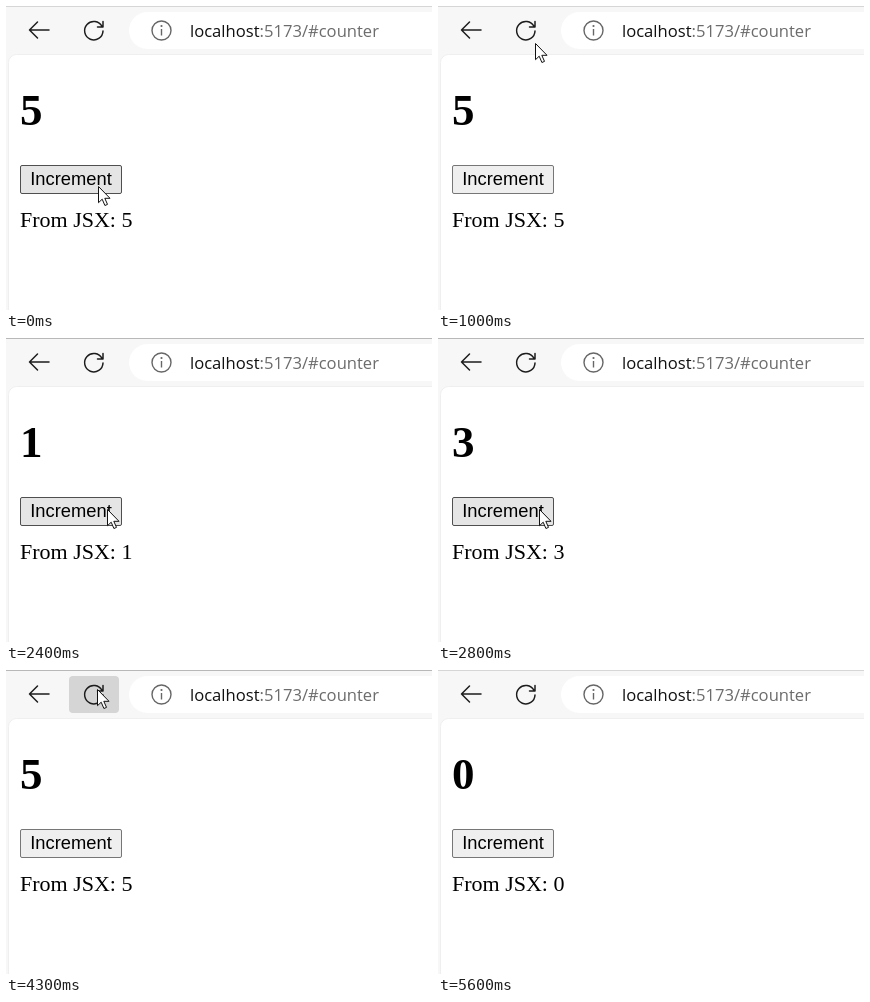
An HTML page that plays this animation: 426 px wide and 304 px high, repeating every 5700 ms.

```html
<!DOCTYPE html>
<html lang="en">
<head>
<meta charset="utf-8">
<title>Counter demo</title>
<style>
  html, body { margin: 0; width: 100%; height: 100%; overflow: hidden; background: #fff; }
  svg { display: block; width: 426px; height: 304px; }
  text { white-space: pre; }
  .url { font: 16.6px "Open Sans", "Noto Sans", sans-serif; }
  .serif { font-family: "Liberation Serif", serif; }
  .icon { fill: none; stroke: #1c1c1c; stroke-width: 1.5; stroke-linecap: round; stroke-linejoin: round; }
</style>
</head>
<body>
<svg viewBox="0 0 426 304">
  <rect width="426" height="304" fill="#f7f7f7"/>
  <rect id="edge" width="426" height="1"/>
  <rect x="2.5" y="48.5" width="440" height="270" rx="8" fill="#fff" stroke="#efefef"/>
  <rect x="123" y="6" width="330" height="37" rx="18.5" fill="#fff"/>
  <rect id="reload" x="63" y="6" width="50" height="37" rx="4"/>

  <g class="icon">
    <path d="M43 24H23.5M31.5 16L23.5 24L31.5 32"/>
    <path d="M97 25A9.2 9.2 0 1 1 96 20.5M97 15.5V21H91.5"/>
  </g>
  <g fill="none" stroke="#666" stroke-width="1.4">
    <circle cx="155.5" cy="24.5" r="9.5"/>
    <path d="M155.5 23V29.5"/>
  </g>
  <circle cx="155.5" cy="20" r="1.1" fill="#666"/>
  <text class="url" x="184" y="31" fill="#6c6c6c"><tspan fill="#111">localhost</tspan>:5173/#counter</text>

  <text id="heading" class="serif" x="14" y="118.5" font-size="45" font-weight="700"></text>
  <rect id="button" x="14.5" y="159.5" width="101" height="28" rx="1.5"/>
  <text x="65" y="179" text-anchor="middle" font-family="Liberation Sans, sans-serif" font-size="18.33">Increment</text>
  <text id="label" class="serif" x="14" y="221" font-size="22"></text>

  <path id="cursor" d="M0 0V16.2L3.7 12.7L6.4 19L9 17.9L6.3 11.8H11.5Z"
    fill="#fff" stroke="#111" stroke-linejoin="round"/>
</svg>
<script>
  const LOOP = 5700, STEP = 100;
  const FIRST_RELOAD = 1300, FIRST_CLICK = 2200, CLICK_GAP = 250, SECOND_RELOAD = 4500;
  const FOCUS = 1100, BLUR = 5600;

  const onButton = { x: 101, y: 171 }, onReload = { x: 91, y: 19 };

  // The pointer eases from one stop to the next.
  const stops = [
    { t: 0, x: 92, y: 180 },
    { t: 700, x: 92, y: 180 },
    { t: 1000, x: 97, y: 37 },
    { t: 1100, ...onReload },
    { t: 1400, ...onReload },
    { t: 1800, x: 105, y: 154 },
    { t: 2000, ...onButton },
    { t: 3400, ...onButton },
    { t: 3500, x: 107, y: 107 },
    { t: 4000, ...onReload },
    { t: 4500, ...onReload },
    { t: 4900, x: 164, y: -30 }
  ];

  const el = id => document.getElementById(id);
  const clamp = (v, lo, hi) => Math.min(hi, Math.max(lo, v));
  const smooth = k => k * k * (3 - 2 * k);

  function pointerAt(t) {
    const i = stops.findLastIndex(stop => stop.t <= t);
    const a = stops[i], b = stops[i + 1] ?? a;
    const k = smooth((t - a.t) / (b.t - a.t || 1));
    return { x: Math.round(a.x + (b.x - a.x) * k), y: Math.round(a.y + (b.y - a.y) * k) };
  }

  function countAt(t) {
    if (t < FIRST_RELOAD) return 5;
    if (t >= SECOND_RELOAD) return 0;
    return clamp(Math.floor((t - FIRST_CLICK) / CLICK_GAP) + 1, 0, 5);
  }

  const inside = (p, left, top, right, bottom) =>
    p.x >= left && p.x <= right && p.y >= top && p.y <= bottom;

  function draw(t) {
    const p = pointerAt(t), count = countAt(t);
    const overButton = inside(p, 14, 159, 116, 188);
    const overReload = inside(p, 63, 6, 113, 36);
    el("heading").textContent = count;
    el("label").textContent = `From JSX: ${count}`;
    el("button").setAttribute("fill", overButton ? "#e5e5e5" : "#efefef");
    el("button").setAttribute("stroke", overButton ? "#4f4f4f" : "#767676");
    el("reload").setAttribute("fill", overReload ? "#d5d5d5" : "none");
    el("edge").setAttribute("fill", t >= FOCUS && t < BLUR ? "#b8b8b8" : "#d6d6d6");
    el("cursor").setAttribute("transform", `translate(${p.x + 0.5} ${p.y + 0.5})`);
  }

  const start = performance.now();
  function tick() {
    const t = (performance.now() - start) % LOOP;
    draw(Math.floor(t / STEP) * STEP);
    requestAnimationFrame(tick);
  }
  tick();
</script>
</body>
</html>
```
